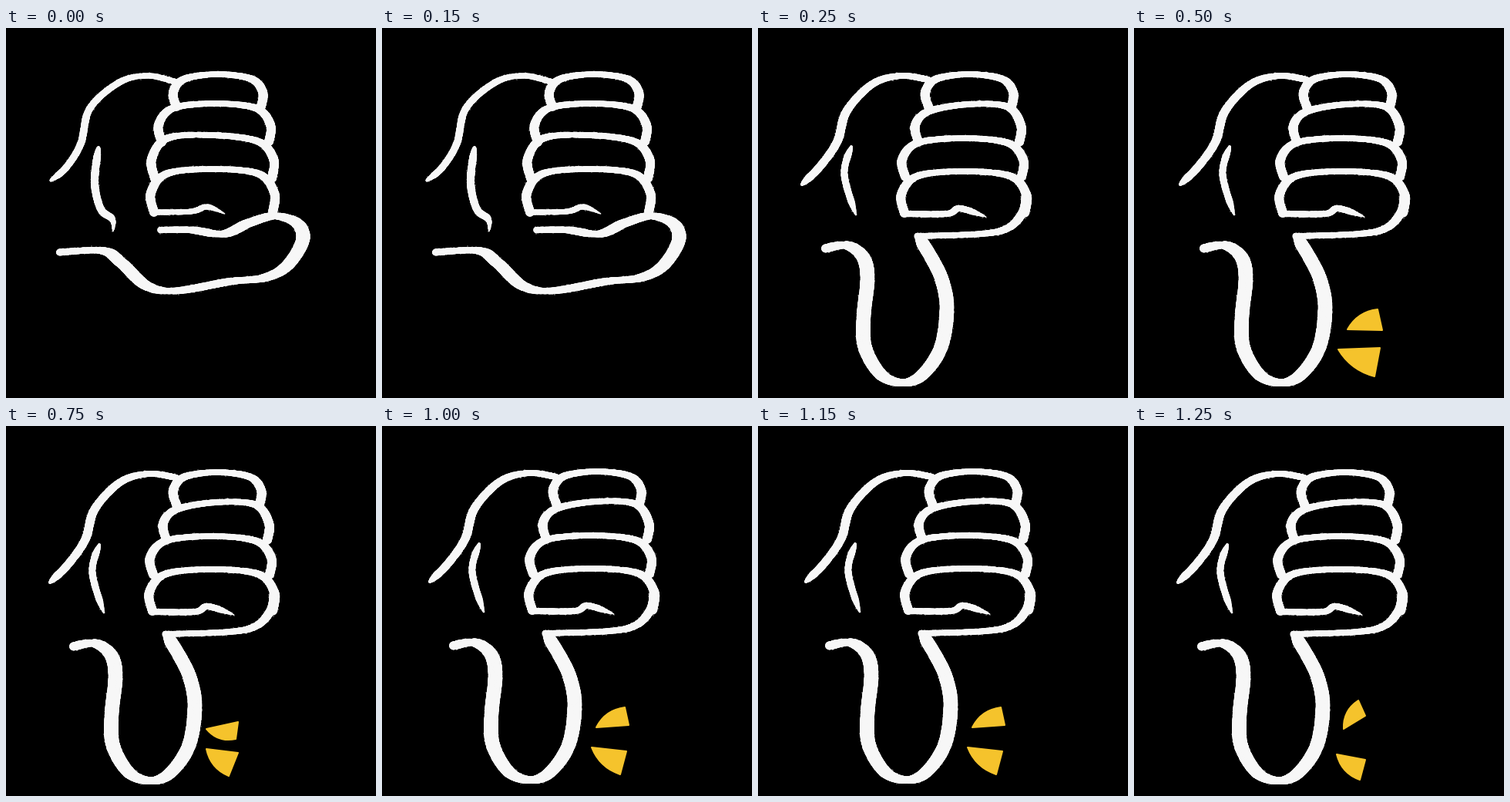
Write an HTML page with a canvas that moves like this. It is 480 by 480 pixels and loops after 1500 ms.

```html
<!DOCTYPE html>
<html lang="en">
<head>
<meta charset="utf-8">
<title>Thumbs down</title>
<style>
  html, body { margin: 0; width: 100%; height: 100%; overflow: hidden; background: #000; }
  canvas { display: block; width: 480px; height: 480px; }
</style>
</head>
<body>
<canvas id="stage" width="480" height="480"></canvas>
<script>
const SIZE = 480, STEP = 250;
const WHITE = '#f7f7f7', YELLOW = '#f5c32c';
const ctx = document.getElementById('stage').getContext('2d');

function random(seed) {
  return () => {
    seed = (seed * 1664525 + 1013904223) % 4294967296;
    return seed / 4294967296;
  };
}

// Catmull-Rom curve through flat x, y key points, sampled about every half pixel.
function curve(keys) {
  const last = keys.length / 2 - 1, out = [];
  const at = (i, k) => keys[2 * Math.max(0, Math.min(last, i)) + k];
  const blend = (i, k, t) => {
    const [a, b, c, d] = [i - 1, i, i + 1, i + 2].map(n => at(n, k));
    return b + 0.5 * t * (c - a + t * (2 * a - 5 * b + 4 * c - d + t * (3 * (b - c) + d - a)));
  };
  for (let i = 0; i < last; i++) {
    const steps = Math.ceil(2 * Math.hypot(at(i + 1, 0) - at(i, 0), at(i + 1, 1) - at(i, 1)));
    for (let s = 0; s < steps; s++) out.push([blend(i, 0, s / steps), blend(i, 1, s / steps)]);
  }
  return out;
}

// A broad nib: thin on level runs, thick on upright ones, with optional tapered ends.
function brush(g, rnd, { keys, thin, thick, head, tail }) {
  const pts = curve(keys), end = pts.length - 1;
  pts.forEach(([x, y], i) => {
    const p = pts[Math.max(0, i - 4)], q = pts[Math.min(end, i + 4)];
    const rise = Math.abs(q[1] - p[1]) / Math.hypot(q[0] - p[0], q[1] - p[1]);
    const taper = Math.min(1, head ? 0.4 + i / 50 : 1, tail ? 0.15 + (end - i) / 50 : 1);
    const r = (thin + (thick - thin) * rise) * taper / 2 - 0.5 + rnd() * 0.7;
    g.beginPath();
    g.arc(x, y, Math.max(0.5, r), 0, 2 * Math.PI);
    g.fill();
    // chalky grain along the edge
    if (rnd() < 0.2) {
      const angle = rnd() * 2 * Math.PI, reach = r + rnd() * 0.8;
      g.fillRect(Math.round(x + reach * Math.cos(angle)) - 0.5, Math.round(y + reach * Math.sin(angle)) - 0.5, 1, 1);
    }
  });
}

const stroke = (keys, thin, thick, head, tail) => ({ keys, thin, thick, head, tail });

// A finger is an arch over a box; tilt lowers the left shoulder and lifts the right one.
function finger(left, right, top, bottom, tilt = 0) {
  const inset = 0.13 * (right - left), side = top + 0.55 * (bottom - top), shoulder = top + 6;
  return stroke([
    left + 4, bottom, left, side, left + inset, shoulder + tilt,
    (left + right) / 2, top,
    right - inset, shoulder - tilt, right, side, right - 2, bottom
  ], 7.5, 12);
}

const sideways = [
  stroke([58,198, 78,181, 97,150, 109,104, 148,70, 185,62, 220,70], 7, 9.5, true),
  stroke([120,155, 115,200, 123,235, 138,248, 139,264], 9, 10, true, true),
  finger(217, 333, 60, 102),
  finger(198, 343, 98, 148),
  finger(189, 347, 139, 195, -2),
  finger(188, 348, 183, 239),
  stroke([190,239, 240,238, 261,232, 284,241], 7, 8, false, true),
  stroke([200,262, 240,262, 282,267, 315,253, 348,244, 377,253, 385,275, 365,308, 335,324,
          290,329, 220,341, 182,334, 150,305, 125,289, 69,291], 8, 18)
];

const down = [
  stroke([57,203, 81,179, 103,147, 115,108, 148,73, 185,62, 221,67], 7.5, 11.5, true),
  stroke([121,154, 112,190, 127,243], 7, 9, true, true),
  finger(217, 331, 60, 102),
  finger(204, 341, 99, 148, 3),
  finger(187, 344, 143, 193),
  finger(186, 348, 186, 240),
  stroke([189,241, 245,241, 262,234, 296,245], 8, 9, false, true),
  stroke([348,215, 344,238, 325,259, 290,267, 206,270], 7.5, 12),
  stroke([207,269, 226,300, 239,328, 245,365, 237,415, 213,450, 188,460, 160,450, 139,415,
          137,375, 142,325, 136,297, 115,282, 87,286], 9, 18.5, true)
];

function drawHand(strokes, seed) {
  const layer = document.createElement('canvas');
  layer.width = layer.height = SIZE;
  const g = layer.getContext('2d'), rnd = random(seed);
  g.fillStyle = WHITE;
  strokes.forEach(s => brush(g, rnd, s));
  return layer;
}

// A shard runs from its tip to two corners; the edge to the first corner bulges outward.
function drawShard([tipX, tipY, ax, ay, bx, by]) {
  const dx = ax - tipX, dy = ay - tipY;
  const side = Math.sign(dx * (by - tipY) - dy * (bx - tipX));
  const bulge = 12 * side / Math.hypot(dx, dy);
  ctx.beginPath();
  ctx.moveTo(tipX, tipY);
  ctx.quadraticCurveTo((tipX + ax) / 2 + dy * bulge, (tipY + ay) / 2 - dx * bulge, ax, ay);
  ctx.lineTo(bx, by);
  ctx.closePath();
  ctx.fill();
  ctx.stroke();
}

const fist = drawHand(sideways, 7);
const thumbDown = drawHand(down, 23);

const poses = [
  { hand: fist, x: 0, y: 0, shards: [] },
  { hand: thumbDown, x: 0, y: 0, shards: [] },
  { hand: thumbDown, x: 3, y: 0, shards: [[277,391, 316,365, 322,392], [265,417, 312,452, 319,415]] },
  { hand: thumbDown, x: 0, y: 0, shards: [[260,393, 298,406, 301,384], [260,419, 289,454, 301,424]] },
  { hand: thumbDown, x: 5, y: -1, shards: [[278,391, 315,365, 320,388], [272,417, 309,452, 317,422]] },
  { hand: thumbDown, x: 0, y: 0, shards: [[272,393, 291,356, 300,376], [263,426, 293,459, 300,433]] }
];

const start = performance.now();

function render(now) {
  const elapsed = Math.max(0, now - start);
  const pose = poses[Math.floor(elapsed / STEP) % poses.length];
  ctx.fillStyle = '#000';
  ctx.fillRect(0, 0, SIZE, SIZE);
  ctx.drawImage(pose.hand, pose.x, pose.y);
  ctx.fillStyle = ctx.strokeStyle = YELLOW;
  ctx.lineWidth = 2;
  ctx.lineJoin = 'round';
  pose.shards.forEach(drawShard);
  requestAnimationFrame(render);
}

render(start);
</script>
</body>
</html>
```
